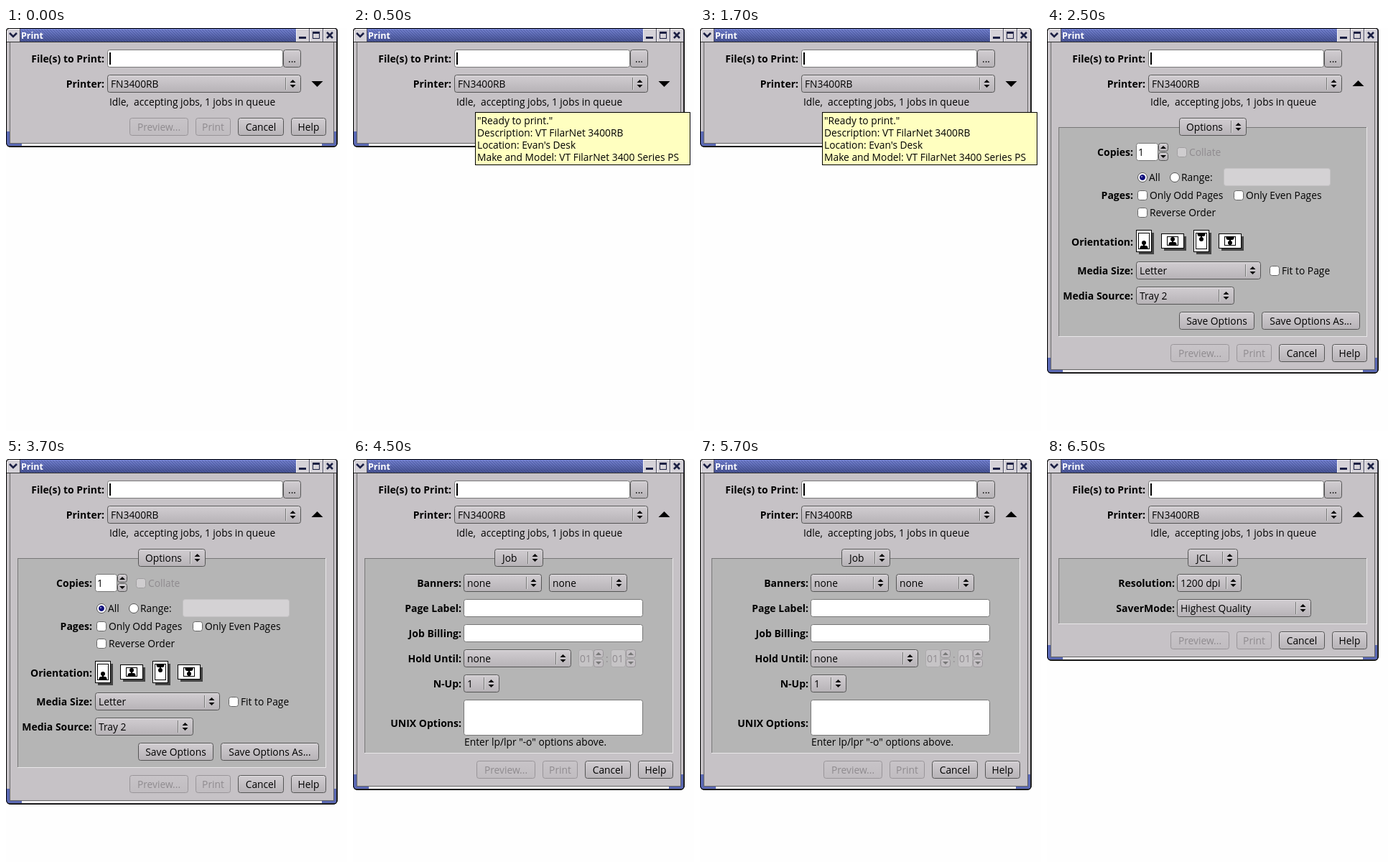
Recreate the animation shown at these times as an HTML page with a canvas. Size 475 by 561 pixels, loop 8000 ms.

```html
<!DOCTYPE html>
<html lang="en">
<head>
<meta charset="utf-8">
<title>Print dialog</title>
<style>
html, body { margin: 0; width: 475px; height: 561px; overflow: hidden; background: #fefefe; }
canvas { display: block; }
</style>
</head>
<body>
<canvas id="stage" width="475" height="561"></canvas>
<script>
const g = document.getElementById('stage').getContext('2d');
const GRAY = '#c6c2c6', OFF = '#8f8b8f', BLUE = '#5a68b4', PRINTER = 'FN3400RB';

function rect(x, y, w, h, color) {
  g.fillStyle = color;
  g.fillRect(x, y, w, h);
}

function text(s, x, cy, { bold, color = '#000', align = 'left', size = bold ? 14 : 13.8 } = {}) {
  g.font = `${bold ? 'bold ' : ''}${size}px "Open Sans", "Noto Sans", sans-serif`;
  g.textAlign = align;
  g.fillStyle = color;
  g.fillText(s, x, cy + 5);
}

const label = (s, x, cy) => text(s, x, cy, { bold: true, align: 'right' });

function poly(color, ...p) {
  g.beginPath();
  for (let i = 0; i < p.length; i += 2) g.lineTo(p[i], p[i + 1]);
  g.closePath();
  g.fillStyle = color;
  g.fill();
}

function box(x, y, w, h, fill, line, r = 3) {
  g.beginPath();
  g.roundRect(x + .5, y + .5, w - 1, h - 1, r);
  g.fillStyle = fill;
  g.fill();
  g.strokeStyle = line;
  g.lineWidth = 1;
  g.stroke();
}

const field = (x, y, w, h = 25) => box(x, y, w, h, '#fff', '#777');

function raised(x, y, w, h = 25, off = false) {
  const fade = g.createLinearGradient(0, y, 0, y + h);
  fade.addColorStop(0, off ? '#c8c4c8' : '#d2ced2');
  fade.addColorStop(1, off ? '#c0bcc0' : '#b6b2b6');
  box(x, y, w, h, fade, off ? '#999599' : '#555');
  if (!off) rect(x + 3, y + 1, w - 6, 1, '#e2dfe2');
}

function button(s, x, y, w, off) {
  raised(x, y, w, 25, off);
  text(s, x + w / 2, y + 13, { align: 'center', color: off ? OFF : '#000' });
}

function arrow(x, y, dir, color = '#000', half = 4) {
  poly(color, x - half, y, x + half, y, x, y - dir * half);
}

function choice(s, x, y, w, pad = 5) {
  const right = x + w;
  raised(x, y, w);
  text(s, x + pad, y + 13);
  rect(right - 22, y + 4, 1, 17, '#777');
  rect(right - 21, y + 4, 1, 17, '#ddd');
  arrow(right - 11.5, y + 11, 1);
  arrow(right - 11.5, y + 14, -1);
}

function spinner(s, x, y, w, off) {
  if (off) box(x, y, w, 25, '#c6c4c6', '#acaaac');
  else field(x, y, w);
  text(s, x + (off ? 2 : 3), y + 13, { color: off ? OFF : '#000' });
  for (const dy of [0, 13]) {
    raised(x + w, y + dy, 14, 12, off);
    arrow(x + w + 7, y + dy + (dy ? 4 : 8), dy ? -1 : 1, off ? '#777' : '#000');
  }
}

function check(s, x, cy, off) {
  box(x, cy - 7, 14, 14, off ? '#cfcdcf' : '#fff', off ? '#a09ea0' : '#666');
  text(s, x + 17, cy, { color: off ? OFF : '#000' });
}

function radio(s, x, cy, on) {
  box(x - 7, cy - 7, 14, 14, '#fff', '#555', 6.5);
  if (on) {
    box(x - 4, cy - 4, 8, 8, '#10107c', '#10107c', 3.5);
    rect(x - 2, cy - 2, 2, 2, '#7c7cc0');
  }
  text(s, x + 9, cy);
}

// Page icon with a framed little figure, upright or turned over
function page(x, y, w, h, flip) {
  rect(x + 3, y + 3, w + 1, h + 1, '#444');
  rect(x - 1, y - 1, w + 2, h + 2, '#000');
  rect(x, y, w, h, '#fff');
  g.save();
  g.translate(x + w / 2, y + h / 2);
  if (flip) g.scale(1, -1);
  const base = h / 2 - 4;
  g.strokeStyle = '#000';
  g.lineWidth = 1;
  g.strokeRect(-7.5, 3.5 - h / 2, 15, h - 7);
  g.fillStyle = '#000';
  g.beginPath();
  g.arc(0, base - 8, 3, 0, 7);
  g.fill();
  g.beginPath();
  g.roundRect(-5.5, base - 4, 11, 4, [3, 3, 0, 0]);
  g.fill();
  g.fillRect(-1, base - 6, 2, 3);
  g.restore();
}

function titleBar() {
  const fade = g.createLinearGradient(0, 1, 0, 19);
  fade.addColorStop(0, '#7482d0');
  fade.addColorStop(1, '#465290');
  rect(1, 1, 460, 18, fade);
  g.save();
  g.beginPath();
  g.rect(20, 2, 383, 17);
  g.clip();
  g.strokeStyle = '#28347a66';
  g.lineWidth = 1;
  g.beginPath();
  for (let x = 0; x < 410; x += 4) {
    g.moveTo(x, 1);
    g.lineTo(x + 18, 19);
  }
  g.stroke();
  g.restore();
  text('Print', 21, 10, { bold: true, color: '#fff', size: 12.5 });

  for (const x of [1, 404, 423, 442]) {
    rect(x, 1, 18, 18, '#d5d2d8');
    rect(x, 1, 18, 1, '#f4f2f5');
    rect(x, 1, 1, 18, '#f4f2f5');
    rect(x + 18, 1, 1, 18, '#4a4a60');
  }
  g.strokeStyle = '#1c2044';
  g.lineWidth = 2.6;
  g.beginPath();
  g.moveTo(5, 7); g.lineTo(10, 12); g.lineTo(15, 7);
  g.moveTo(447, 6); g.lineTo(455, 14);
  g.moveTo(455, 6); g.lineTo(447, 14);
  g.stroke();
  rect(408, 12, 10, 3, '#1c2044');
  g.lineWidth = 1;
  g.strokeRect(427.5, 5.5, 9, 9);
  rect(427, 5, 10, 3, '#1c2044');
}

function frame(h) {
  const corners = [4, 4, 6, 6];
  g.save();
  g.beginPath();
  g.roundRect(0, 0, 462, h, corners);
  g.clip();
  rect(0, 0, 462, h, '#333');
  rect(1, 1, 459, h - 3, GRAY);
  rect(5, 20, 1, h - 26, '#666');
  rect(456, 20, 1, h - 26, '#666');
  for (const x of [1, 457]) rect(x, h - 22, x < 9 ? 4 : 3, 20, BLUE);
  rect(5, h - 6, 452, 1, '#666');
  rect(1, h - 5, 459, 3, BLUE);
  rect(22, h - 5, 418, 3, '#f4f2f4');
  titleBar();
  rect(1, 19, 460, 1, '#333');
  g.restore();
  g.beginPath();
  g.roundRect(.5, .5, 461, h - 1, corners);
  g.strokeStyle = '#000';
  g.lineWidth = 1;
  g.stroke();
}

function dialog(h, tab) {
  frame(h);
  label('File(s) to Print:', 137, 43);
  field(141, 30, 245);
  rect(144, 34, 2, 17, '#000');
  button('...', 386, 30, 25);
  label('Printer:', 137, 78);
  choice(PRINTER, 141, 65, 270);
  text('Idle,  accepting jobs, 1 jobs in queue', 144, 103);
  arrow(433.5, tab ? 81 : 74, tab ? 1 : -1, '#000', 8);

  const y = h - 41;
  button('Preview...', 172, y, 82, true);
  button('Print', 264, y, 49, true);
  button('Cancel', 323, y, 64);
  button('Help', 397, y, 49);
  if (!tab) return;

  // Sunken panel: dark top and left, light bottom and right
  rect(16, 138, 430, h - 189, '#e8e6e8');
  rect(16, 138, 429, h - 190, '#777');
  rect(17, 139, 428, h - 191, '#b5b5b5');
  choice(...tab);
}

function tooltip() {
  dialog(166);
  rect(170, 117, 300, 74, '#000');
  rect(171, 118, 298, 72, '#ffffc0');
  ['"Ready to print."', 'Description: VT FilarNet 3400RB', "Location: Evan's Desk",
    'Make and Model: VT FilarNet 3400 Series PS'].forEach((s, i) => text(s, 173, 129 + 17 * i));
}

function options() {
  dialog(481, ['Options', 184, 125, 94, 10]);
  label('Copies:', 120, 173);
  spinner('1', 124, 160, 31);
  check('Collate', 181, 173, true);
  radio('All', 133, 208, true);
  radio('Range:', 178, 208);
  box(246, 195, 149, 25, '#d4d2d4', '#c4c2c4');
  label('Pages:', 120, 233);
  check('Only Odd Pages', 126, 233);
  check('Only Even Pages', 260, 233);
  check('Reverse Order', 126, 257);
  label('Orientation:', 120, 298);
  page(125, 282, 20, 29);
  page(160, 287, 30, 19);
  page(205, 282, 20, 29, true);
  page(240, 287, 30, 19, true);
  label('Media Size:', 120, 338);
  choice('Letter', 124, 325, 174);
  check('Fit to Page', 310, 338);
  label('Media Source:', 120, 373);
  choice('Tray 2', 124, 360, 137);
  button('Save Options', 184, 395, 105);
  button('Save Options As...', 299, 395, 137);
}

function job() {
  dialog(461, ['Job', 197, 125, 68, 11]);
  ['Banners:', 'Page Label:', 'Job Billing:', 'Hold Until:', 'N-Up:']
    .forEach((s, i) => label(s, 151, 173 + 35 * i));
  choice('none', 154, 160, 109);
  choice('none', 273, 160, 109);
  field(154, 195, 250);
  field(154, 230, 250);
  choice('none', 154, 265, 150);
  spinner('01', 314, 265, 21, true);
  text(':', 352, 278, { color: OFF });
  spinner('01', 359, 265, 21, true);
  choice('1', 154, 300, 50);
  label('UNIX Options:', 151, 368);
  field(154, 335, 250, 50);
  text('Enter lp/lpr "-o" options above.', 155, 394);
}

function jcl() {
  dialog(281, ['JCL', 196, 125, 70, 12]);
  label('Resolution:', 178, 173);
  choice('1200 dpi', 181, 160, 90);
  label('SaverMode:', 178, 208);
  choice('Highest Quality', 181, 195, 187);
}

const scenes = [[6500, jcl], [4500, job], [2500, options], [500, tooltip], [0, () => dialog(166)]];

function tick() {
  const t = performance.now() % 8000;
  rect(0, 0, 475, 561, '#fefefe');
  scenes.find(([start]) => t >= start)[1]();
  requestAnimationFrame(tick);
}
tick();
</script>
</body>
</html>
```
